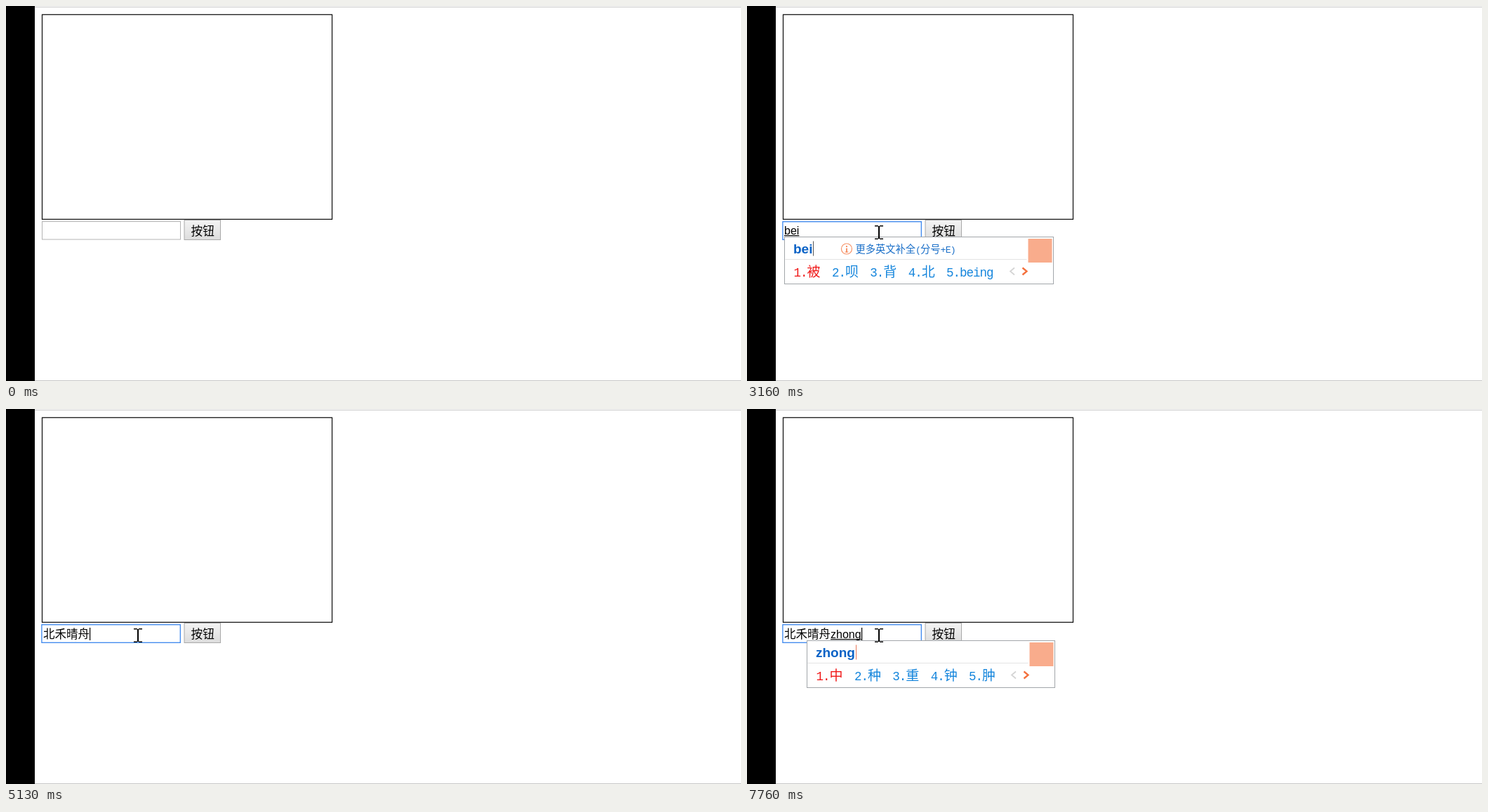
Write an HTML page with a canvas that moves like this. It is 1047 by 535 pixels and loops after 7990 ms.

```html
<!DOCTYPE html>
<html lang="zh-CN">
<head>
<meta charset="utf-8">
<title>Input method typing</title>
<style>
html, body { margin: 0; width: 100%; height: 100%; overflow: hidden; background: #fff; }
canvas { display: block; width: 1047px; height: 535px; }
</style>
</head>
<body>
<canvas id="stage" width="1047" height="535"></canvas>
<script>
const ctx = document.getElementById('stage').getContext('2d');
const LOOP = 7990;
const CJK = '"Noto Sans CJK SC", "Noto Sans CJK", sans-serif';
const LATIN = '"Liberation Sans", Arial, sans-serif';
const MONO = '"Liberation Mono", monospace';
const STEP = 78;
const TEXT_X = 53;
const INPUT = { x: 50, y: 307, w: 199, h: 27 };

const ZHONG = '中 种 重 钟 肿';
const ZHO = '中 这 中间 种种 周';
const MORE = '更多英文补全(分号+E)';
const TOOLS = '工具箱(分号)';

// Each key press: time, committed text, composition, candidates, panel right edge, hint.
const events = [
  { at: 900, done: '', blink: 410 },
  { at: 1640, done: '', comp: 'b', list: '不 吧 把 被 比', right: 407.5 },
  { at: 2230, done: '', comp: 'be', list: '被 呗 背 北 bei', right: 420.5 },
  { at: 2370, done: '', comp: 'bei', list: '被 呗 背 北 being', right: 436.5, hint: MORE, hintAt: 2850 },
  { at: 3320, done: '', comp: 'beih', list: '悲欢 被害 备货 背后 北海', right: 504.5 },
  { at: 3470, done: '', comp: 'beihe', list: '北禾 被喝 被和 背合 北', right: 485.5 },
  { at: 3790, done: '北禾', blink: 600, fade: true },
  { at: 4350, done: '北禾', comp: 'q', list: '去 且 钱 (づ￣3￣)づ_╭♡～ 亲', right: 584.5 },
  { at: 4430, done: '北禾', comp: 'qi', list: '起 其 气 期 七', right: 438.5 },
  { at: 4590, done: '北禾', comp: 'qin', list: '亲 琴 勤 秦 沁', right: 438.5 },
  { at: 4800, done: '北禾', comp: 'qingz', list: '晴舟 庆祝 情至 请 青', right: 504.5 },
  { at: 5130, done: '北禾晴舟' },
  { at: 5380, done: '北禾晴舟', comp: 'z', list: '在 这 中 做 再', right: 438.5 },
  { at: 5450, done: '北禾晴舟', comp: 'zh', list: '这 中 着 之 只', right: 438.5 },
  { at: 5520, done: '北禾晴舟', comp: 'zho', list: ZHO, right: 477.5 },
  { at: 5730, done: '北禾晴舟', comp: 'zhon', list: ZHONG, right: 438.5 },
  { at: 5770, done: '北禾晴舟', comp: 'zhong', list: ZHONG, right: 438.5, hint: TOOLS, hintAt: 6180 },
  { at: 6600, done: '北禾晴舟', comp: 'zhon', list: ZHONG, right: 438.5 },
  { at: 6720, done: '北禾晴舟', comp: 'zho', list: ZHO, right: 477.5, hint: TOOLS, hintAt: 7130 },
  { at: 7590, done: '北禾晴舟', comp: 'zhon', list: ZHONG, right: 438.5 },
  { at: 7760, done: '北禾晴舟', comp: 'zhong', list: ZHONG, right: 438.5 }
];

function rect(x, y, w, h, color) {
  ctx.fillStyle = color;
  ctx.fillRect(x, y, w, h);
}

function frame(x, y, w, h, color, width = 1) {
  ctx.strokeStyle = color;
  ctx.lineWidth = width;
  ctx.strokeRect(x, y, w, h);
}

function line(points, color, width) {
  ctx.beginPath();
  points.forEach(([x, y]) => ctx.lineTo(x, y));
  ctx.strokeStyle = color;
  ctx.lineWidth = width;
  ctx.stroke();
}

// Draws text and returns the x where it ends.
function write(text, x, y, font, color) {
  ctx.font = font;
  ctx.fillStyle = color;
  ctx.fillText(text, x, y);
  return x + ctx.measureText(text).width;
}

// Half-width and full-width characters on a terminal-like grid.
function writeCells(text, x, y, size, color) {
  for (const ch of text) {
    const half = /[\x20-\x7e╭]/.test(ch);
    if (ch === '╭') {
      ctx.beginPath();
      ctx.arc(x + 13, y + 1, 9, Math.PI, Math.PI * 1.5);
      ctx.strokeStyle = color;
      ctx.lineWidth = 1.2;
      ctx.stroke();
      x += 2.5;
    } else if (ch !== '_') {
      write(ch, x, y, half ? `${size * 0.92}px ${MONO}` : `300 ${size}px ${CJK}`, color);
    }
    x += half ? size / 2 : size;
  }
  return x;
}

function drawPage(focused) {
  rect(0, 0, 1047, 535, '#fff');
  rect(41, 1, 1006, 1, '#c8c8c8');
  rect(41, 534, 1006, 1, '#c8c8c8');
  rect(0, 0, 41, 535, '#000');
  frame(51.5, 12.3, 413, 292, '#111', 1.25);

  if (focused) frame(50.9, 307.7, 197.4, 25.6, '#3a86ee', 1.3);
  else frame(51.5, 307.5, 197, 25.5, '#b4b4b4');

  const shade = ctx.createLinearGradient(0, 305, 0, 333);
  shade.addColorStop(0, '#f4f4f4');
  shade.addColorStop(1, '#dddddd');
  rect(254, 305, 52, 28, shade);
  frame(254, 305.5, 51.5, 28, '#a9a9a9');
  write('按钮', 263.5, 326.5, `16.67px ${CJK}`, '#000');
}

function drawArrow(x, y) {
  const shape = [[0, 0], [0, 20], [4.6, 15.8], [8, 23], [11, 21.6], [7.8, 14.6], [14, 14.4]];
  ctx.beginPath();
  shape.forEach(([dx, dy]) => ctx.lineTo(x + dx, y + dy));
  ctx.closePath();
  ctx.fillStyle = '#fff';
  ctx.fill();
  ctx.strokeStyle = '#000';
  ctx.lineWidth = 1.1;
  ctx.stroke();
}

function drawBeam(x, y) {
  rect(x - 1, y - 9, 2, 18, '#000');
  for (const dy of [-10, 8.5]) {
    rect(x - 6, y + dy, 5, 1.5, '#000');
    rect(x + 1, y + dy, 5, 1.5, '#000');
  }
}

function drawPointer(t) {
  if (t < 70) return;
  const step = Math.min(10, Math.floor((t - 70) / STEP));
  const go = (1 - Math.cos(Math.PI * Math.min(1, step / 8))) / 2;
  const back = Math.max(0, step - 8) / 2;
  const x = 730 - 553 * go + 11 * back;
  const y = 520 - 203 * go + 6 * back;
  const inside = x > INPUT.x && x < INPUT.x + INPUT.w && y > INPUT.y && y < INPUT.y + INPUT.h;
  (inside ? drawBeam : drawArrow)(x, y);
}

function drawHint(text, x, top, age) {
  const level = Math.min(1, 0.25 + 0.1875 * Math.floor(age / STEP));
  const y = top + 17;
  ctx.save();
  ctx.globalAlpha *= level;
  ctx.strokeStyle = '#f47a45';
  ctx.lineWidth = 1.2;
  ctx.beginPath();
  ctx.arc(x + 8, y, 7.5, 0, Math.PI * 2);
  ctx.stroke();
  rect(x + 7, y - 4.5, 2, 2, '#f47a45');
  rect(x + 7, y - 1, 2, 6, '#f47a45');
  rect(x + 5.5, y + 4, 5, 1, '#f47a45');
  ctx.restore();
  writeCells(text, x + 20.5, top + 22, 14.25, '#1a6fc8');
}

function drawPanel(e, t) {
  const first = !e.done;
  const left = first ? 53.5 : 85.5;
  const top = first ? 329.5 : 330.5;
  const { right } = e;
  rect(left, top, right - left, 67, '#fff');
  frame(left, top, right - left, 67, '#a2a6aa');
  rect(left + 1, top + 31.5, right - left - 39, 1, '#e4e4e4');

  const end = write(e.comp, left + 12.5, top + 23.5, `bold 19px ${LATIN}`, '#0a62c6');
  rect(Math.round(end) + 1, top + 6, 1, 21, first ? '#555' : '#e8785a');
  if (e.hint && t >= e.hintAt) drawHint(e.hint, end + 40.5, top, t - e.hintAt);

  let x = left + 13;
  e.list.split(' ').forEach((word, i) => {
    x = writeCells(`${i + 1}.${word}`, x, top + 56, 19, i ? '#1485dc' : '#f01818') + 16.4;
  });

  const y = top + 49;
  const chevron = (cx, d, color, w) => line([[cx - d, y - 5], [cx + d, y], [cx - d, y + 5]], color, w);
  chevron(right - 58.5, -3, '#d4d4d4', 1.7);
  chevron(right - 41, 3, '#f4703c', 2.3);
  rect(right - 36, top + 2.5, 34, 34, '#f9ac8c');
}

function drawInput(e, t) {
  const base = e.done ? 327 : 326;
  write(e.done, TEXT_X, 327.3, `16.5px ${CJK}`, '#000');
  const start = TEXT_X + e.done.length * 16.5;
  let end = start;
  if (e.comp) {
    end = write(e.comp, start, base, `16px ${LATIN}`, '#000');
    rect(start, base + 1, end - start, 1.2, '#000');
  }
  if (t - e.at < (e.blink || 500)) rect(Math.round(end), 312, 1.2, 18, '#000');
}

function draw(t) {
  const index = events.findLastIndex(e => e.at <= t);
  const e = events[index];
  drawPage(Boolean(e));
  if (e) drawInput(e, t);
  if (e && e.comp) drawPanel(e, t);
  if (e && e.fade && t - e.at < 80) {
    ctx.globalAlpha = 0.4;
    drawPanel(events[index - 1], t);
    ctx.globalAlpha = 1;
  }
  drawPointer(t);
}

const begin = performance.now();
function tick() {
  draw((performance.now() - begin) % LOOP);
  requestAnimationFrame(tick);
}
tick();
</script>
</body>
</html>
```
